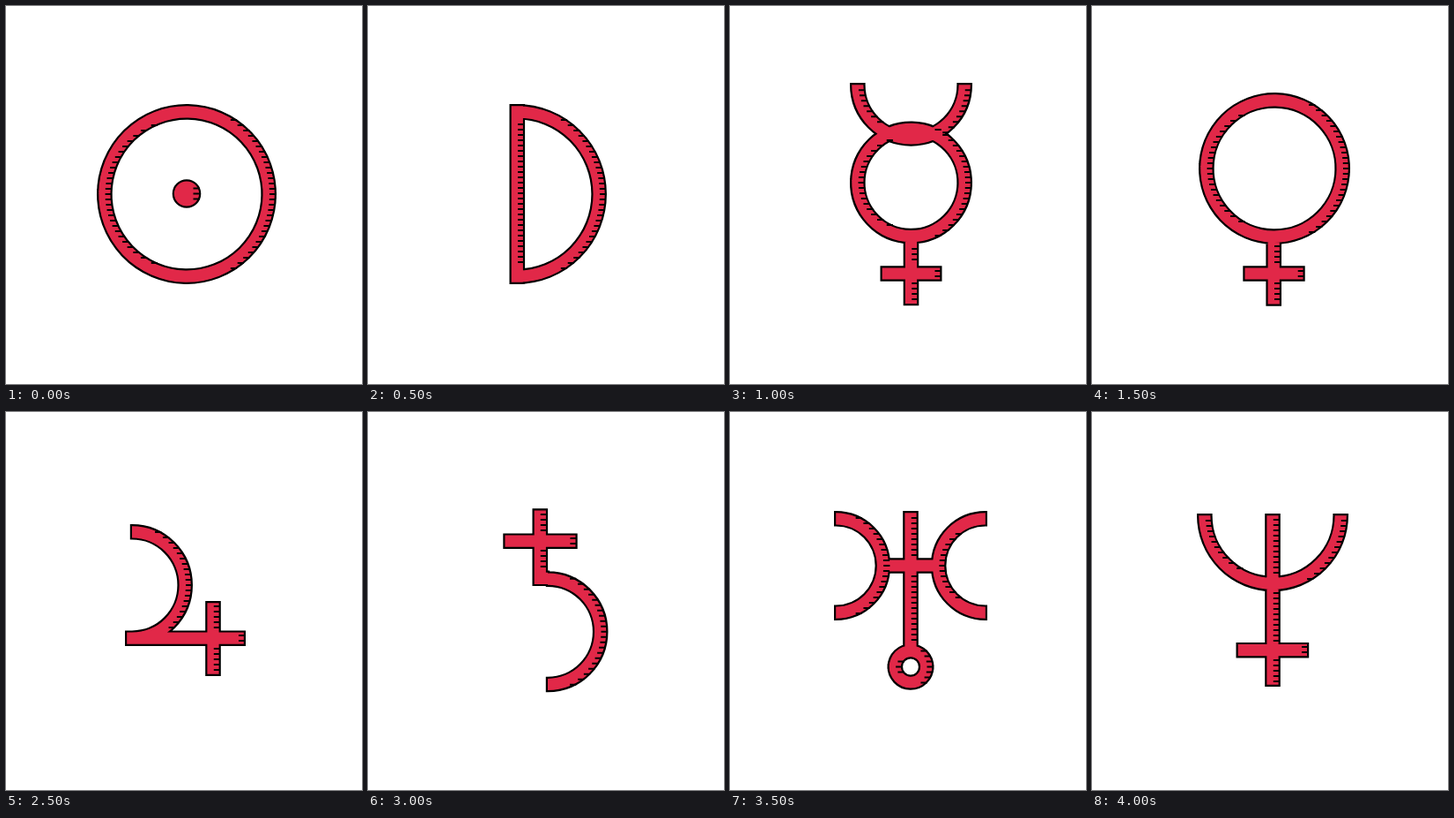
Animation of 404x428 px, one loop 4500 ms. Source, as an HTML page:

```html
<!DOCTYPE html>
<html lang="en">
<head>
<meta charset="utf-8">
<title>Planet symbols</title>
<style>
  html, body { margin: 0; width: 100%; height: 100%; overflow: hidden; background: #fff; }
  svg { display: block; width: 100%; height: 100%; }
  g { visibility: hidden; animation: show 4.5s step-end infinite; }
  path { stroke-miterlimit: 4; }
  .outline { fill: #000; stroke: #000; stroke-width: 4.4; }
  .fill { fill: #e12848; }
  .ticks { fill: none; stroke: #000; stroke-width: 1.9; }
  @keyframes show {
    0% { visibility: visible; }
    11.1112%, 100% { visibility: hidden; }
  }
</style>
</head>
<body>
<svg id="stage" viewBox="0 0 404 428"></svg>
<script>
const LINE = 2.2, HALF = 6.6, BAND = 2 * (LINE + HALF), STEP = 6;
const f = n => n.toFixed(2);

// Every shape runs clockwise so overlapping pieces merge into one fill.
function bar(x0, y0, x1, y1) {
  const len = Math.hypot(x1 - x0, y1 - y0);
  const nx = (y1 - y0) / len * HALF, ny = (x0 - x1) / len * HALF;
  return `M${f(x0 + nx)} ${f(y0 + ny)}L${f(x1 + nx)} ${f(y1 + ny)}` +
         `L${f(x1 - nx)} ${f(y1 - ny)}L${f(x0 - nx)} ${f(y0 - ny)}Z`;
}

function arc(cx, cy, radius, from, to) {
  const outer = radius - LINE, inner = radius - BAND + LINE;
  const at = (r, deg) => {
    const a = deg * Math.PI / 180;
    return `${f(cx + r * Math.cos(a))} ${f(cy + r * Math.sin(a))}`;
  };
  const large = to - from > 180 ? 1 : 0;
  return `M${at(outer, from)}A${outer} ${outer} 0 ${large} 1 ${at(outer, to)}` +
         `L${at(inner, to)}A${inner} ${inner} 0 ${large} 0 ${at(inner, from)}Z`;
}

const ring = (cx, cy, r) => arc(cx, cy, r, 0, 182) + arc(cx, cy, r, 180, 362);

function disc(cx, cy, radius) {
  const r = radius - LINE;
  return `M${cx - r} ${cy}a${r} ${r} 0 1 1 ${2 * r} 0a${r} ${r} 0 1 1 ${-2 * r} 0Z`;
}

// Ticks end at the right edge of a stroke.
const tick = (x, y) => `M${f(x - 8)} ${f(y)}H${f(x - 0.8)}`;

function column(x, from, to, slope = 0) {
  let d = '';
  for (let y = from; y <= to; y += STEP) d += tick(x + slope * (y - from), y);
  return d;
}

function curve(cx, cy, r, side, from, to) {
  let d = '';
  for (let y = Math.ceil(from * r / STEP) * STEP; y <= to * r; y += STEP)
    d += tick(cx + side * Math.sqrt(r * r - y * y), cy + y);
  return d;
}

const outerTicks = (cx, cy, r, from = -0.88, to = 0.88) => curve(cx, cy, r, 1, from, to);
const innerTicks = (cx, cy, r, from = -0.93, to = 0.93) => curve(cx, cy, r - BAND, -1, from, to);
const ringTicks = (cx, cy, r) => outerTicks(cx, cy, r) + innerTicks(cx, cy, r);

const symbols = [
  // Sun
  [ring(205, 213, 102) + disc(205, 212.5, 16.3),
   ringTicks(205, 213, 102) + column(220.5, 206.5, 219)],
  // Moon
  [bar(169.3, 113.2, 169.3, 312.8) + arc(169, 213, 102, -90, 90),
   outerTicks(169, 213, 102) + column(178, 134, 293)],
  // Mercury
  [arc(205.5, 89.2, 69.5, 0, 180) + ring(205.5, 200, 69.5) +
   bar(205.5, 261, 205.5, 337) + bar(172.7, 303, 238.3, 303),
   outerTicks(205.5, 89.2, 69.5, 0.08, 0.85) + innerTicks(205.5, 89.2, 69.5, 0.1, 0.9) +
   ringTicks(205.5, 200, 69.5) + column(214.3, 275, 291) +
   column(214.3, 314, 334) + column(240.5, 300, 307)],
  // Venus
  [ring(207, 184, 86) + bar(206.2, 261, 206.2, 337.5) + bar(173.5, 303, 239.5, 303),
   ringTicks(207, 184, 86) + column(215, 272, 293) +
   column(215, 314, 334) + column(241.7, 300, 307)],
  // Mars
  [ring(185, 232.7, 86) + bar(238, 180, 301, 117) +
   bar(249.4, 117, 307.6, 117) + bar(301, 110.4, 301, 166.2),
   ringTicks(185, 232.7, 86) + column(290, 140, 176, -1) + column(309.8, 116, 165)],
  // Jupiter
  [arc(143, 196, 69, -90, 90) + bar(137.2, 256.2, 269.8, 256.2) + bar(235, 216.2, 235, 296.8),
   outerTicks(143, 196, 69, -0.88, 0.7) + column(243.8, 220, 246) +
   column(243.8, 268, 294) + column(272, 253, 260)],
  // Saturn
  [bar(195.3, 111.4, 195.3, 194.7) + bar(155.5, 146.2, 235.5, 146.2) +
   bar(188.7, 188.3, 204, 188.3) + arc(204, 248.8, 68.5, -90, 90),
   outerTicks(204, 248.8, 68.5) + column(203.8, 116, 136) +
   column(203.8, 157, 179) + column(237.5, 143, 150)],
  // Uranus
  [arc(120.2, 174, 62, -90, 90) + arc(289.8, 174, 62, 90, 270) +
   bar(173, 174, 237, 174) + bar(205, 114.2, 205, 270) + ring(205, 288.5, 26.5),
   outerTicks(120.2, 174, 62) + innerTicks(289.8, 174, 62, -0.9, 0.9) +
   column(213.8, 120, 164) + column(213.8, 186, 260) + ringTicks(205, 288.5, 26.5)],
  // Neptune
  [arc(205, 117.2, 86, 0, 180) + bar(205, 117.2, 205, 308.8) + bar(165.7, 269.7, 244, 269.7),
   outerTicks(205, 117, 86, 0.05, 0.88) + innerTicks(205, 117, 86, 0.06, 0.95) +
   column(213.8, 122, 184) + column(213.8, 205, 259) +
   column(213.8, 281, 306) + column(246, 266, 273)]
];

document.getElementById('stage').innerHTML = symbols.map(([shape, ticks], i) =>
  `<g style="animation-delay:${i * 500 - (i ? 4500 : 0)}ms">
    <path class="outline" d="${shape}"/><path class="fill" d="${shape}"/><path class="ticks" d="${ticks}"/>
  </g>`).join('');
</script>
</body>
</html>
```
